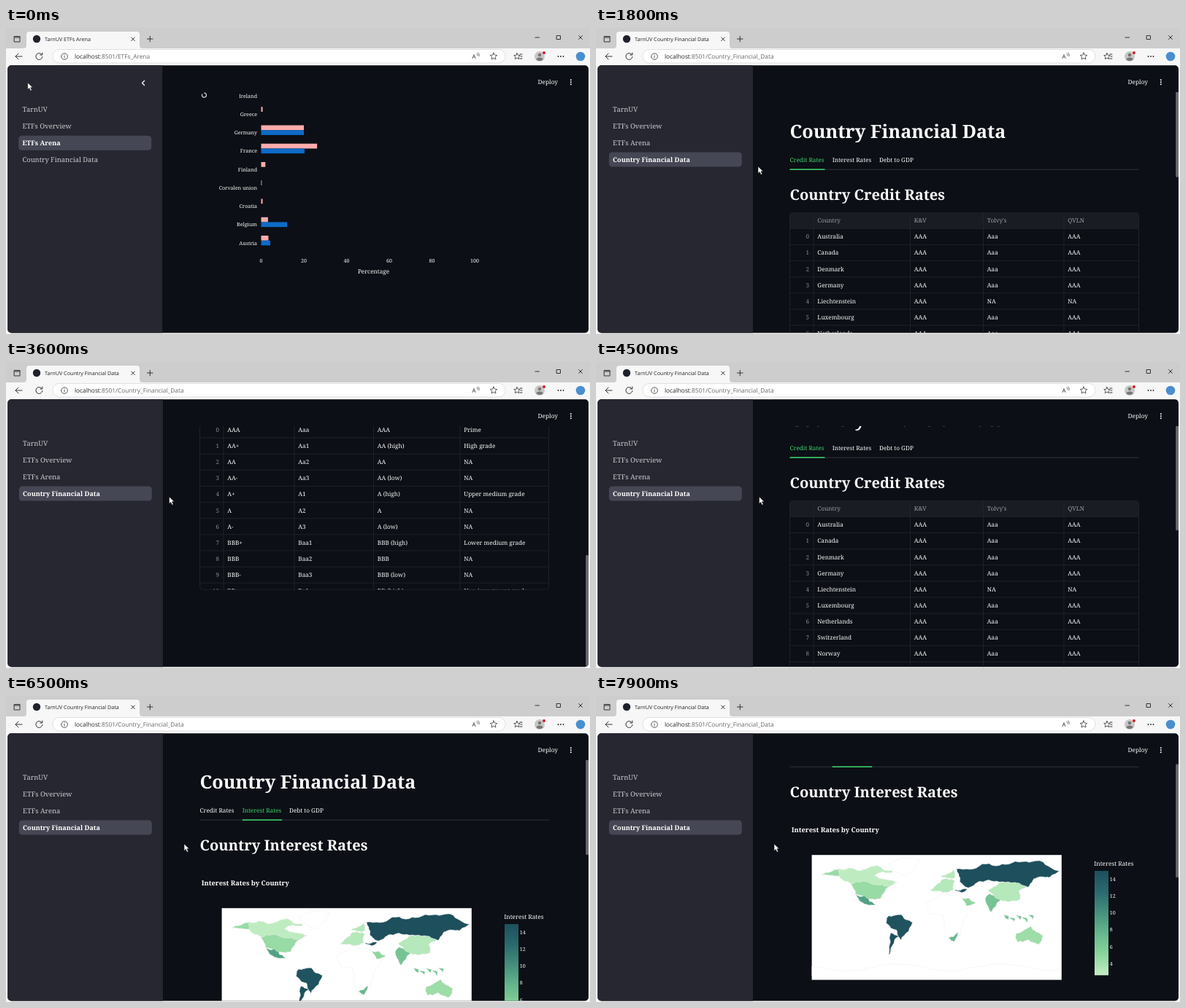
An HTML page for the animation above (8000 ms loop, 800 by 420 pixels).

```html
<!DOCTYPE html>
<html lang="en">
<head>
<meta charset="utf-8">
<title>Country Financial Data</title>
<style>
  html, body { margin: 0; width: 100%; height: 100%; overflow: hidden; background: #f7f7f7; }
  #stage { display: block; width: 800px; height: 420px; }
  text { font-family: "Noto Serif", serif; fill: #fafafa; text-rendering: geometricPrecision; white-space: pre; }
  .ui text { font-family: "Open Sans", "Noto Sans", sans-serif; fill: #222; }
  .line { fill: none; stroke: #333; stroke-width: 1; stroke-linecap: round; stroke-linejoin: round; }
  .thin { stroke-width: .8; }
  .grid { fill: none; stroke: #24262f; stroke-width: .8; }
  .cell, .tab { font-weight: 500; }
  .item { fill: #cbccd0; font-size: 9.4px; }
  .item.on { fill: #fff; font-size: 9px; font-weight: 700; }
  .tab.on { fill: #3dd56d; }
</style>
</head>
<body>
<svg id="stage" viewBox="0 0 800 420"></svg>
<script>
const LOOP = 8000, STEP = 100;
const BRAND = "TarnUV", AGENCIES = ["K&amp;V", "Tolvy's", "QVLN"];
const RAMP = ["#c3eec3", "#8bd59c", "#66b88e", "#46907d", "#2a6a6e", "#1d4f5c"];
const stage = document.getElementById("stage");

// Markup helpers; y is the middle of the capitals
const text = (x, y, str, size, attrs = "") =>
  `<text x="${x}" y="${y + size * .357}" font-size="${size}" ${attrs}>${str}</text>`;
const rect = (x, y, w, h, fill, r = 0, attrs = "") =>
  `<rect x="${x}" y="${y}" width="${w}" height="${h}" rx="${r}" fill="${fill}" ${attrs}/>`;
const line = (d, attrs = "") => `<path class="line" d="${d}" ${attrs}/>`;
const circle = (x, y, r, fill) => `<circle cx="${x}" cy="${y}" r="${r}" fill="${fill}"/>`;
const group = (id, content) => `<g id="${id}">${content}</g>`;
const times = (n, make) => Array.from({ length: n }, (_, i) => make(i));
const repeat = (n, make) => times(n, make).join("");

function star(cx, cy, r) {
  const points = times(10, i => {
    const a = i * Math.PI / 5 - Math.PI / 2, k = i % 2 ? r * .48 : r;
    return `${cx + k * Math.cos(a)},${cy + k * Math.sin(a)}`;
  });
  return line(`M${points.join("L")}Z`, 'style="stroke-width:.8"');
}

function browser() {
  return `<g class="ui">
    ${rect(0, 0, 800, 28, "#cdcdcd")}
    <path d="M24 28q4 0 4-4V9q0-4 4-4h147q4 0 4 4v15q0 4 4 4z" fill="#f7f7f7"/>
    ${line("M11.5 11.5h7.5v7.5h-7.5zM11.5 13h7.5")}
    ${circle(42, 15, 5.2, "#20222b")}
    ${text(53, 15, "", 7.2, 'id="title"')}
    ${line("M171.7 13l4.6 4.6m0-4.6l-4.6 4.6M193.5 15h7.5m-3.7-3.7v7.5")}
    ${line("M725 13h5.5M754.5 10.5h5v5h-5zM784.5 10.5l5 5m0-5l-5 5")}
    ${line("M22 39h-9m4-4l-4 4 4 4M49.2 36.5a4.5 4.5 0 1 0 .7 3M49.8 34v3h-3")}
    ${rect(64, 29.5, 620, 18.5, "#fff", 9, 'stroke="#d5d5d5" stroke-width=".7"')}
    ${line("M75.7 39a4.3 4.3 0 1 1 0 .1M80 38.5v2.5m0-4.2v.1", 'style="stroke-width:.8"')}
    <text x="94" y="42" font-size="8.3">localhost<tspan id="path" fill="#666"></tspan></text>
    ${text(638.5, 39, "A", 8)}${line("M645 35q1.5 1 1 3m.6-4.3q2.5 2 1.5 5", 'style="stroke-width:.7"')}
    ${star(668, 39, 5)}${star(700, 39, 4.5)}${line("M704 36h3m-2 3h2m-3 3h3")}
    ${circle(731, 39, 7, "#c9c7c6")}${circle(731, 37, 2.3, "#777")}
    <path d="M726.5 43.5q0-3 4.5-3t4.5 3q-4.5 3-9 0z" fill="#777"/>
    ${circle(737, 34, 2, "#d31f2a")}
    ${repeat(3, i => circle(756.5 + i * 3.5, 39, .9, "#222"))}
    ${circle(787, 39, 6.3, "#498fd0")}
  </g>`;
}

function sidebar() {
  const names = [BRAND, "ETFs Overview", "ETFs Arena", "Country Financial Data"];
  return rect(2, 51, 213, 368, "#262730", 0, 'id="side"') +
    group("nav", rect(17.5, 0, 182, 20, "#464754", 4.5, 'id="pill"') +
      rect(17.5, 170.5, 182, 20, "#353640", 4.5, 'id="hover"') +
      names.map((s, i) => `<text class="item" x="22.8" y="${115.3 + i * 22.8}">${s}</text>`).join("")) +
    line("M189.5 72.5l-3 3 3 3", 'id="chevron" style="stroke:#fafafa;stroke-width:1.4"');
}

function barChart() {
  const shares = { Ireland: [0, 0], Greece: [.7, 0], Germany: [20, 20], France: [26.2, 20.3], Finland: [2, 0],
    "Corvalen union": [.3, 0], Croatia: [.7, 0], Belgium: [3.2, 12.2], Austria: [3.4, 4.3] };
  const X0 = 349.5, UNIT = 2.925;
  const bars = Object.entries(shares).map(([name, [pink, blue]], i) => {
    const y = 93 + i * 25.25;
    return text(344, y, name, 7.1, 'text-anchor="end"') +
      rect(X0, y - 10, pink * UNIT, 6.7, "#ffabab") + rect(X0, y - 3.3, blue * UNIT, 6.7, "#0d6bc8");
  });
  return bars.join("") +
    repeat(6, i => text(X0 + i * 20 * UNIT, 319, i * 20, 7.1, 'text-anchor="middle"')) +
    text(503.5, 334, "Percentage", 8.2, 'text-anchor="middle"') +
    line("M268.7 91a3 3 0 1 0 3-1.8", 'id="spinner" style="stroke:#d4d4d8;stroke-width:1.3"');
}

// A scrolling table box, cut off after ten rows and a bit
function table(y, edges, header, rows) {
  const H = 253, ROW = 22.13;
  const lines = edges.map(x => `M${x} ${y}v${H}`).join("") + repeat(11, i => `M265.5 ${y + ROW * (i + 1)}h478`);
  const cell = (s, c, cy, attrs) => text(edges[c] + 5.3, cy, s, 8.2, `class="cell" ${attrs}`);
  const body = rows.map((row, i) => {
    const cy = y + ROW * (i + 1.5);
    return text(292, cy, i, 8, 'text-anchor="end" style="fill:#8b8c94"') + row.map((s, c) => cell(s, c, cy)).join("");
  });
  return `<svg x="265" y="${y}" width="479" height="${H}" viewBox="265 ${y} 479 ${H}">
    ${rect(265.5, y, 478, ROW, "#1a1c24", 4)}<path class="grid" d="${lines}"/>
    ${header.map((s, c) => cell(s, c, y + ROW / 2, 'style="fill:#9b9ca4;font-weight:400"')).join("")}${body.join("")}
    ${rect(265.5, y + .4, 478, H - .8, "none", 4, 'class="grid"')}</svg>`;
}

const h2 = (y, str) => text(265.5, y, str, 20.1, 'font-weight="600"');

function creditPage() {
  const countries = ["Australia", "Canada", "Denmark", "Germany", "Liechtenstein", "Luxembourg",
    "Netherlands", "Switzerland", "Norway", "Sweden", "Singapore"];
  const rates = countries.map(c => [c, "AAA", ...(c === "Liechtenstein" ? ["NA", "NA"] : ["Aaa", "AAA"])]);
  const grades = ["Prime", "High grade", "Upper medium grade", "Lower medium grade", "Non-investment grade"];
  const scale = times(11, i => {
    const band = Math.ceil(i / 3), notch = (i + 2) % 3, letters = ["AAA", "AA", "A", "BBB", "BB"][band];
    const own = ["Aaa", "Aa", "A", "Baa", "Ba"][band];
    if (!i) return [letters, own, letters, grades[0]];
    return [letters + ["+", "", "-"][notch], own + (notch + 1),
      letters + [" (high)", "", " (low)"][notch], notch ? "NA" : grades[band]];
  });
  return h2(229, "Country Credit Rates") +
    group("rates", table(253.2, [298, 430.5, 530.5, 641], ["Country", ...AGENCIES], rates) +
      h2(545, "Credit Rates Scale") +
      table(568.8, [298, 395, 503.5, 622], [...AGENCIES, "Grade"], scale));
}

function seeded(seed) {
  return () => (seed = seed * 16807 % 2147483647) / 2147483647;
}

// Turns a few corners into a ragged coast by midpoint displacement
function coast(corners, rand, depth = 4) {
  if (!depth) return `M${corners.join("L")}Z`;
  return coast(corners.flatMap(([x, y], i) => {
    const [u, v] = corners[(i + 1) % corners.length], k = (rand() - .5) * .26;
    return [[x, y], [(x + u) / 2 + (v - y) * k, (y + v) / 2 - (u - x) * k]];
  }), rand, depth - 1);
}

function rateColor(rate) {
  const pos = Math.min(4.99, Math.max(0, (rate - 2.6) / 12.4 * 5)), i = Math.floor(pos);
  const mix = [1, 3, 5].map(c => {
    const [a, b] = [RAMP[i], RAMP[i + 1]].map(hex => parseInt(hex.slice(c, c + 2), 16));
    return Math.round(a + (b - a) * (pos - i));
  });
  return `rgb(${mix})`;
}

// Interest rate and rough corners (longitude,latitude); no rate leaves the land blank
const LAND = {
  greenland: [0, "-70,78 -25,83 -44,60"],
  africa: [0, "-16,20 10,36 33,31 50,11 35,-24 18,-34 9,4 -8,5"],
  canada: [2.8, "-141,60 -141,70 -85,75 -63,66 -90,60 -56,51 -82,43 -124,49"],
  usa: [4.5, "-124,48 -95,49 -68,46 -81,27 -97,27 -117,33"],
  alaska: [4.5, "-141,70 -166,62 -141,60"],
  mexico: [9, "-116,32 -104,31 -88,18 -105,20"],
  brazil: [14.6, "-70,2 -51,4 -35,-7 -52,-33 -58,-18 -73,-8"],
  argentina: [15, "-66,-22 -55,-27 -65,-42 -69,-54"],
  southAfrica: [7.5, "17,-30 31,-22 25,-35"],
  arabia: [5, "36,29 56,21 43,17"],
  india: [6.5, "70,25 75,34 93,26 78,8"],
  china: [3.2, "74,39 88,48 120,51 131,46 118,38 120,26 98,24"],
  australia: [4.3, "114,-24 135,-12 153,-27 147,-39 132,-32 116,-35"],
  europe: [3.2, "-9,38 8,55 26,53 24,40"],
  nordics: [3.2, "6,59 26,71 26,58"],
  turkey: [15, "26,40 44,41 36,36"],
  russia: [15, "28,70 104,77 180,68 162,58 140,56 132,44 118,50 76,54 46,43 33,52"]
};

function worldMap() {
  const K = .95, rand = seeded(77);
  const shape = (d, rate) => `<path d="${d}" fill="${rate ? rateColor(rate) : "#fff"}"/>`;
  const lands = Object.values(LAND).map(([rate, corners]) =>
    shape(coast(corners.split(" ").map(p => p.split(",").map(Number)), rand), rate));
  const islands = repeat(5, i => {
    const x = 100 + i * 9, y = 1 - i % 2 * 4;
    return shape(coast([[x - 4, y + 3], [x + 4, y + 1], [x + 3, y - 4]], rand, 3), 6.5);
  });
  const ice = `M-180-84${repeat(37, i => `L${i * 10 - 180} ${-73 + 5 * Math.sin(i * .42 - 3.6) + 2 * rand()}`)}`;
  return rect(295.6, 315.2, 342.2, 171.4, "#fff") +
    `<g transform="translate(466.8 401) scale(${K} ${-K})" stroke="#ececec" stroke-width=".5">
      ${shape(ice)}${lands.join("")}${islands}</g>`;
}

function interestPage() {
  return h2(228.5, "Country Interest Rates") +
    group("plot", text(267.8, 281, "Interest Rates by Country", 9.3, 'font-weight="600"') + worldMap() +
      text(682.3, 327.5, "Interest Rates", 8.3) + rect(683, 337, 19, 143.3, "url(#ramp)") +
      repeat(6, i => text(703.8, 348.2 + i * 23.2, 14 - 2 * i, 7.1)) +
      table(547, [298, 415.5, 489, 576, 668.5], ["Country", "Last", "Previous", "Reference", "Unit"], []));
}

const TABS = [["Credit Rates", 265.5, 48], ["Interest Rates", 323.7, 54.5], ["Debt to GDP", 388, 48]];

stage.innerHTML = `<defs>
    <clipPath id="window">${rect(2.3, 51.3, 795.7, 367.2, "#000", 5)}</clipPath>
    <clipPath id="view">${rect(215, 88, 583, 331, "#000")}</clipPath>
    <linearGradient id="ramp" y1="1" x2="0" y2="0">
      ${RAMP.map((c, i) => `<stop offset="${i / 5}" stop-color="${c}"/>`).join("")}
    </linearGradient>
  </defs>
  ${browser()}
  <g clip-path="url(#window)">${rect(2, 51, 797, 368, "#0c0f15")}${sidebar()}
    ${text(728.5, 74, "Deploy", 8.3, 'font-weight="500"')}
    ${repeat(3, i => circle(773.8, 71.2 + i * 3, 1, "#fafafa"))}
    <g clip-path="url(#view)">
      ${group("chart", barChart())}
      ${group("page", text(265.5, 142, "Country Financial Data", 25.2, 'font-weight="700"') +
        group("body", TABS.map(([s, x]) => text(x, 181, s, 8.2, 'class="tab"')).join("") +
          rect(265.5, 193.7, 478.5, 1, "#31333f") + rect(0, 193.4, 0, 1.5, "#3dd56d", 0, 'id="mark"') +
          group("credit", creditPage()) + group("interest", interestPage())))}
      ${rect(794.2, 0, 3.8, 0, "#6a6b71", 1.9, 'id="thumb"')}
    </g>
  </g>
  <path id="cursor" d="M0 0v9.5l2.2-2 1.7 3.7 1.8-.8-1.7-3.6h3z" fill="#fff" stroke="#111" stroke-width=".6"/>`;

const $ = id => document.getElementById(id);
const set = (id, attrs) => Object.entries(attrs).forEach(([name, value]) => $(id).setAttribute(name, value));
const show = (id, on) => set(id, { display: on ? "inline" : "none" });
const move = (id, x, y) => set(id, { transform: `translate(${x} ${y})` });
const mark = (name, chosen) => document.querySelectorAll(name).forEach((el, i) => el.classList.toggle("on", i === chosen));

// Key poses as [time, value, ...], joined by straight moves
const SCROLL = [[1900, 0], [3600, 509], [3700, 490], [4500, 63], [4700, 24], [6500, 24], [7200, 150], [7900, 97]];
const CURSOR = [[0, 29.7, 75], [700, 62, 178], [1300, 64, 179], [1800, 222, 190], [2100, 223.5, 185],
  [4700, 223.5, 185], [5200, 350, 157], [5600, 347, 160], [6400, 244, 203]];

function at(rows, t) {
  const i = rows.findIndex(row => row[0] > t);
  if (i < 1) return (i ? rows[rows.length - 1] : rows[0]).slice(1);
  const [from, to] = [rows[i - 1], rows[i]], k = (t - from[0]) / (to[0] - from[0]);
  return from.slice(1).map((v, c) => v + (to[c + 1] - v) * k);
}

function draw(t) {
  const arena = t < 900, interest = t >= 5300, active = arena ? 2 : 3;
  const [cx, cy] = at(CURSOR, t), [scroll] = at(SCROLL, t);
  const slide = Math.min(1, Math.max(0, (t - 5200) / 300));

  $("title").textContent = `${BRAND} ${arena ? "ETFs Arena" : "Country Financial Data"}`;
  $("path").textContent = `:8501/${arena ? "ETFs_Arena" : "Country_Financial_Data"}`;
  set("side", { width: arena ? 212.3 : 213 });
  move("nav", arena ? -.3 : .3, 0);
  set("pill", { y: 102.1 + active * 22.8 });
  mark(".item", active);
  show("hover", arena && cy > 168);
  show("chevron", cx < 210);

  show("chart", arena);
  set("spinner", { transform: `rotate(${t * .5} 271.7 92.2)` });
  show("page", !arena);
  show("body", t >= 1100);
  show("rates", t >= 1200);
  show("credit", !interest);
  show("interest", interest);
  show("plot", t >= 5600);
  move("page", 0, -scroll);
  const [x, width] = [1, 2].map(c => TABS[0][c] + (TABS[1][c] - TABS[0][c]) * slide);
  set("mark", { x, width });
  mark(".tab", interest ? 1 : 0);

  const height = interest ? 156 : 153;
  set("thumb", { y: 52 + scroll * height / 366, height });
  show("thumb", cx > 215);
  move("cursor", cx, cy);
}

const start = performance.now();
function tick(now) {
  const t = Math.max(0, now - start) % LOOP;
  draw(Math.floor(t / STEP) * STEP);
  requestAnimationFrame(tick);
}
draw(0);
requestAnimationFrame(tick);
</script>
</body>
</html>
```
